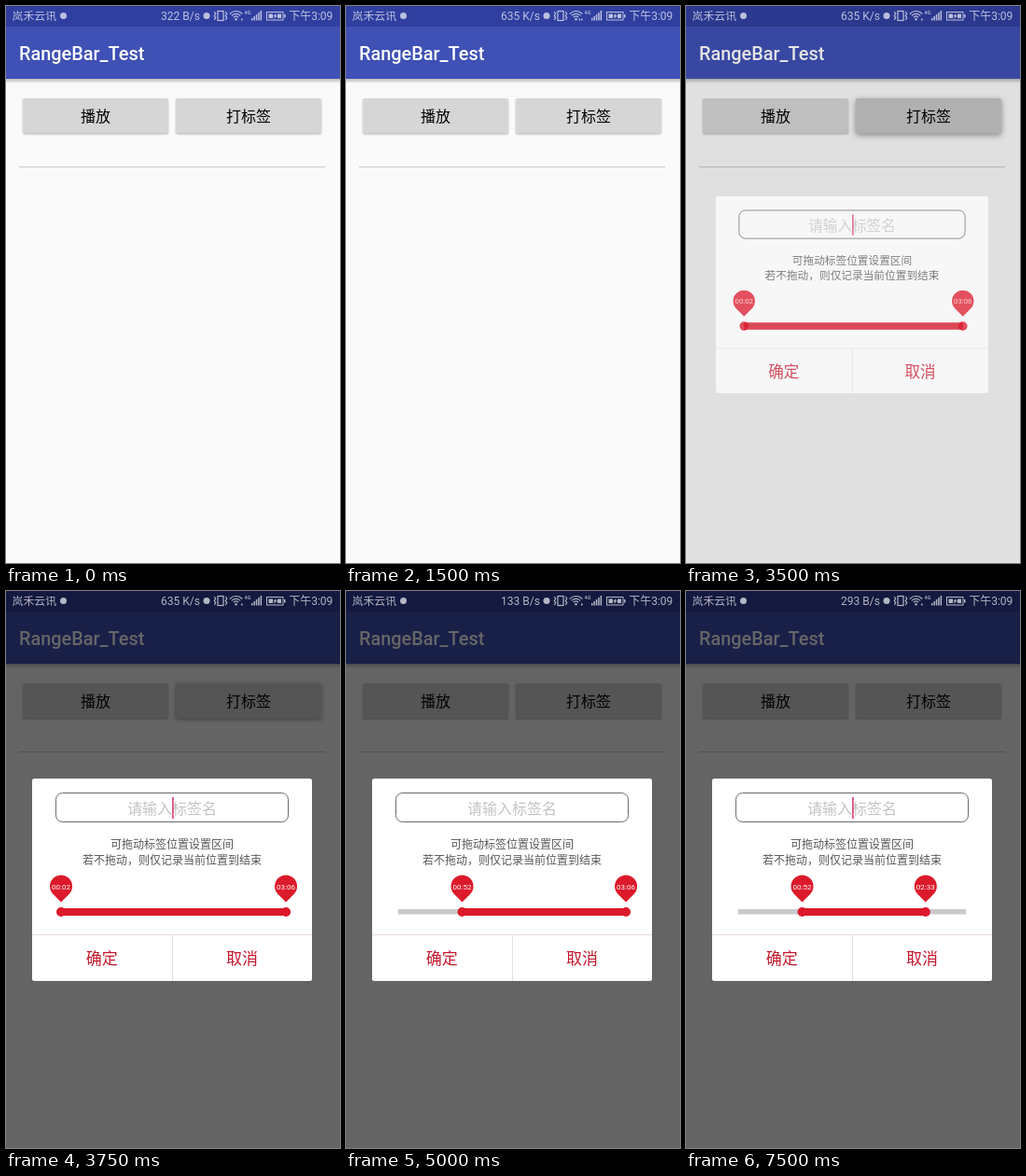
Animation, 358 px wide and 597 px high, one loop 8000 ms. Source, as an HTML page with a canvas:

```html
<!DOCTYPE html>
<html lang="zh-CN">
<head>
<meta charset="utf-8">
<title>RangeBar_Test</title>
<style>
html, body { margin: 0; width: 100%; height: 100%; overflow: hidden; background: #fafafa; }
canvas { display: block; width: 358px; height: 597px; }
</style>
</head>
<body>
<canvas id="stage"></canvas>
<script>
const W = 358, H = 597, LOOP = 8000, STEP = 250;
const FONT = 'Roboto, "Noto Sans CJK SC", "Noto Sans CJK", sans-serif';
const RED = '#dc1a2b', INK = 'rgba(255,255,255,.68)';
const canvas = document.getElementById('stage');
const ctx = canvas.getContext('2d');
const ratio = window.devicePixelRatio || 1;
canvas.width = W * ratio;
canvas.height = H * ratio;

// Value of the last [time, value] key reached
const at = (keys, t) => keys.reduce((v, k) => t >= k[0] ? k[1] : v, keys[0][1]);

const SPEED = [[0, '322 B/s'], [1500, '635 K/s'], [4500, '133 B/s'], [7500, '293 B/s']];
const WIFI = [[0, 0], [1000, 1], [3000, 0], [6000, 1], [7000, 0]];
const PLAY_LIFT = [[0, 0], [250, 1], [500, .5], [750, 0]];
const TAG_LIFT = [[0, 0], [3250, 1], [3750, .5], [4000, 0]];
const TAG_PRESS = [[0, 0], [3500, .08], [3750, .02], [4000, 0]];
const DIM = [[0, 0], [3500, .104], [3750, .6]];
const START = [[0, 2], [4750, 37], [5000, 52]];
const END = [[0, 186], [5750, 161], [6000, 153]];

function rect(x, y, w, h, fill) {
  ctx.fillStyle = fill;
  ctx.fillRect(x, y, w, h);
}

function roundRect(x, y, w, h, r) {
  ctx.beginPath();
  ctx.roundRect(x, y, w, h, r);
}

function dot(x, y, r, fill) {
  ctx.fillStyle = fill;
  ctx.beginPath();
  ctx.arc(x, y, r, 0, Math.PI * 2);
  ctx.fill();
}

function text(str, x, y, size, fill, align = 'center', weight = 400) {
  ctx.font = `${weight} ${size}px ${FONT}`;
  ctx.textAlign = align;
  ctx.fillStyle = fill;
  ctx.fillText(str, x, y);
}

function line(...pts) {
  ctx.beginPath();
  for (let i = 0; i < pts.length; i += 2) ctx.lineTo(pts[i], pts[i + 1]);
  ctx.stroke();
}

function button(x, label, lift, press) {
  ctx.save();
  ctx.shadowColor = `rgba(0,0,0,${.28 + lift * .12})`;
  ctx.shadowBlur = (2 + lift * 4) * ratio;
  ctx.shadowOffsetY = (1 + lift) * ratio;
  ctx.fillStyle = '#d6d6d6';
  roundRect(x, 99, 156, 37.5, 2);
  ctx.fill();
  ctx.restore();
  if (press) {
    ctx.fillStyle = `rgba(0,0,0,${press})`;
    roundRect(x, 99, 156, 37.5, 2);
    ctx.fill();
  }
  text(label, x + 78, 124, 16, '#000', 'center', 500);
}

function drawApp(t) {
  rect(0, 0, W, H, '#fafafa');
  const shade = ctx.createLinearGradient(0, 78, 0, 83);
  shade.addColorStop(0, 'rgba(0,0,0,.26)');
  shade.addColorStop(1, 'rgba(0,0,0,0)');
  rect(0, 78, W, 5, shade);
  rect(0, 22, W, 56, '#3f51b5');
  rect(0, 0, W, 22, '#303f9f');
  text('RangeBar_Test', 14, 57.5, 19.9, '#fff', 'left', 500);
  button(18, '播放', at(PLAY_LIFT, t), 0);
  button(182, '打标签', at(TAG_LIFT, t), at(TAG_PRESS, t));
  rect(14, 172, 328, 1, '#c9c9c9');
}

function drawStatus(t) {
  text('岚禾云讯', 6.5, 14.8, 11.9, INK, 'left');
  dot(61.5, 10.5, 3.5, INK);
  text(at(SPEED, t), 166, 14.6, 12, INK, 'left');
  dot(215, 10.5, 3.5, INK);

  ctx.strokeStyle = INK;
  ctx.lineWidth = 1.2;
  ctx.strokeRect(227, 5.5, 6, 10);
  for (const x of [224, 236]) line(x - .7, 6, x + .7, 8.2, x - .7, 10.4, x + .7, 12.6, x - .7, 15);

  for (const r of [3.4, 6.2, 9]) {
    ctx.beginPath();
    ctx.arc(246.5, 14.5, r, -Math.PI * .77, -Math.PI * .23);
    ctx.stroke();
  }
  dot(246.5, 14.2, 1.2, INK);
  if (at(WIFI, t)) rect(249.5, 13.5, 1.5, 2, INK);
  rect(252, 13.5, 1.5, 2, INK);

  text('4G', 255.5, 9.3, 5.5, INK, 'left', 500);
  for (let i = 0; i < 5; i++) rect(263 + i * 2.4, 13 - i * 2, 1.5, 2.5 + i * 2, INK);

  ctx.lineWidth = 1;
  ctx.strokeRect(279.5, 6.5, 17.5, 8.5);
  rect(298, 9, 1.5, 3.5, INK);
  rect(281.5, 8.5, 4.5, 4.5, INK);
  rect(291, 8.5, 4, 4.5, INK);
  ctx.fillStyle = INK;
  ctx.beginPath();
  ctx.moveTo(290, 7.5);
  ctx.lineTo(286, 11.2);
  ctx.lineTo(288.2, 11.2);
  ctx.lineTo(287, 14);
  ctx.lineTo(291, 10.2);
  ctx.lineTo(288.7, 10.2);
  ctx.fill();
  text('下午3:09', 350.3, 14.6, 12, INK, 'right');
}

const barX = sec => 56.4 + sec * 1.31;
const pad = n => String(n).padStart(2, '0');

function pin(sec, held) {
  const x = barX(sec), y = held ? 300.5 : 316.5;
  dot(x, 344, 5, RED);
  ctx.beginPath();
  ctx.arc(x, y, 12, Math.PI * .75, Math.PI * .25);
  ctx.lineTo(x, y + 17);
  ctx.fill();
  text(`${pad(Math.floor(sec / 60))}:${pad(sec % 60)}`, x, y + 3.2, 8, '#fff');
}

function drawDialog(t) {
  const opening = t < 3750;
  ctx.save();
  if (opening) {
    ctx.globalAlpha = .75;
    ctx.translate(178, 309.5);
    ctx.scale(.973, .973);
    ctx.translate(-178, -309.5);
  }
  ctx.fillStyle = '#fff';
  roundRect(28, 201, 300, 217, 2.5);
  ctx.fill();

  ctx.strokeStyle = '#6a6a6a';
  ctx.lineWidth = 1;
  roundRect(53.5, 216.5, 249, 31, 7);
  ctx.stroke();
  text('请输入标签名', 178, 238.8, 16, '#c4c4c4');
  if (t < 4000 || t % 1000 >= 500) rect(178, 221, 1.8, 23, '#e0507c');

  text('可拖动标签位置设置区间', 178, 276, 12, '#555');
  text('若不拖动，则仅记录当前位置到结束', 178, 292.6, 12, '#555');

  const start = at(START, t), end = at(END, t);
  rect(56, 341, 244, 5.5, '#cacaca');
  rect(barX(start), 340, barX(end) - barX(start), 8, RED);
  pin(start, t === 4750);
  pin(end, t === 5750);

  rect(28, 368, 300, 1, '#eadede');
  rect(178, 368, 1, 50, '#e6dede');
  text('确定', 102.8, 400.2, 17, '#c4172c');
  text('取消', 253, 400.2, 17, '#c4172c');
  ctx.restore();
}

function frame(now) {
  const t = Math.floor(now % LOOP / STEP) * STEP;
  ctx.setTransform(ratio, 0, 0, ratio, 0, 0);
  drawApp(t);
  if (t >= 3500) {
    rect(0, 0, W, H, `rgba(0,0,0,${at(DIM, t)})`);
    drawDialog(t);
  }
  drawStatus(t);
  requestAnimationFrame(frame);
}
requestAnimationFrame(frame);
</script>
</body>
</html>
```
